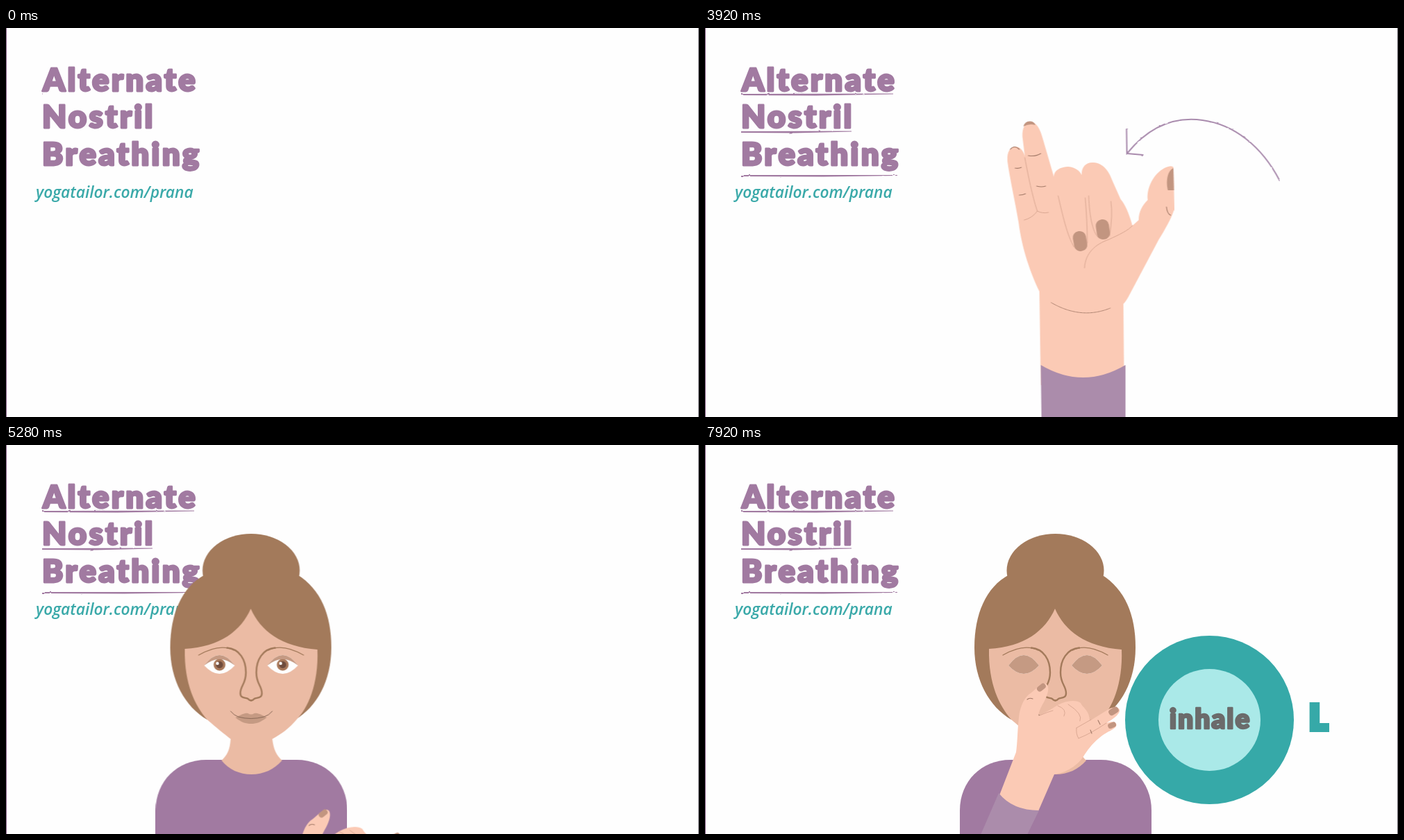
Write an HTML page that moves like this. It is 998x561 px and loops after 8000 ms.

```html
<!DOCTYPE html>
<html lang="en">
<head>
<meta charset="utf-8">
<title>Alternate Nostril Breathing</title>
<style>
html, body { margin: 0; width: 100%; height: 100%; overflow: hidden; background: #fefefe; }
svg { display: block; width: 100vw; height: 100vh; }
.anim { animation: 8s linear infinite; }

.chunky { font-family: Lato, "Open Sans", sans-serif; font-weight: 900; paint-order: stroke; stroke-linejoin: round; }
.title { font-size: 45.5px; letter-spacing: 3.2px; fill: #a17aa1; stroke: #a17aa1; stroke-width: 2.8px; }
.link { font: italic 600 22.8px "Open Sans", "Noto Sans", sans-serif; fill: #3aa9a9; }
.word { font-size: 39px; letter-spacing: 1.9px; fill: #6b6b6b; stroke: #6b6b6b; stroke-width: 2.4px; }
.side { font-size: 51px; fill: #36a9a8; stroke: #36a9a8; stroke-width: 6px; stroke-linejoin: miter; }

.line { fill: none; stroke-linecap: round; stroke-linejoin: round; }
.skin { fill: #fbcab5; }
.nail { fill: #c29580; }
.crease { stroke: #dba994; stroke-width: 1; }
.joint { stroke: #a37a68; stroke-width: 1.1; }
.sleeve { fill: #ab8cab; }
.brown { stroke: #a37a5b; }

/* Underlines */
#rule1 { animation-name: rule1; }
#rule2 { animation-name: rule2; }
#rule3 { animation-name: rule3; }
@keyframes rule1 { 0% { clip-path: inset(-3px 100% -3px 0); } 6%, 100% { clip-path: inset(-3px 0 -3px 0); } }
@keyframes rule2 { 0%, 5% { clip-path: inset(-3px 100% -3px 0); } 11%, 100% { clip-path: inset(-3px 0 -3px 0); } }
@keyframes rule3 { 0%, 10% { clip-path: inset(-3px 100% -3px 0); } 16%, 100% { clip-path: inset(-3px 0 -3px 0); } }

/* Large hand and its arrow */
#leave { animation-name: leave; }
@keyframes leave {
  0%, 48.5% { transform: none; animation-timing-function: cubic-bezier(.333, .26, .667, .593); }
  55%, 100% { transform: translateX(660px); }
}
#rise { animation-name: rise; }
@keyframes rise {
  0%, 18.5% { transform: translateY(567px); animation-timing-function: cubic-bezier(.3333, .6667, .6667, 1); }
  28.5%, 100% { transform: none; }
}
#wipe { animation-name: wipe; }
@keyframes wipe { 0%, 29.5% { width: 0; } 36.5%, 100% { width: 232px; } }

/* Woman */
#woman { animation-name: enter; }
@keyframes enter {
  0%, 60.86% { transform: translateX(-645px); animation-timing-function: cubic-bezier(.3333, .6667, .6667, 1); }
  70.86%, 100% { transform: none; }
}
#lift { animation-name: lift; }
@keyframes lift {
  0%, 63.5% { transform: translate(-35px, 230px); animation-timing-function: cubic-bezier(.3333, .6667, .6667, 1); }
  86.1%, 100% { transform: none; }
}
.lid { fill: #c59a83; animation-name: blink; }
@keyframes blink {
  0%, 73% { d: path("M437 318Q459 288 481 318Q459 300 437 318Z"); }
  79%, 100% { d: path("M437 318Q459 288 481 318Q459 342 437 318Z"); }
}

/* Breathing circle */
#breath { animation-name: show; }
@keyframes show { 0%, 81% { opacity: 0; } 85%, 100% { opacity: 1; } }
#lung { animation-name: inhale; }
@keyframes inhale { 0%, 83% { r: 52px; } 99%, 100% { r: 73.5px; } }
</style>
</head>
<body>
<svg viewBox="0 0 998 561" preserveAspectRatio="none">
  <defs>
    <filter id="rough" filterUnits="userSpaceOnUse" x="0" y="0" width="998" height="561">
      <feTurbulence type="fractalNoise" baseFrequency=".1" numOctaves="2" seed="4"/>
      <feDisplacementMap in="SourceGraphic" scale="2" xChannelSelector="R" yChannelSelector="G"/>
    </filter>
    <clipPath id="arrowClip"><rect id="wipe" class="anim" x="560" y="110" width="0" height="130"/></clipPath>
    <clipPath id="eyeClip"><path d="M437 318Q459 288 481 318Q459 342 437 318Z"/></clipPath>
    <g id="eye" clip-path="url(#eyeClip)">
      <rect x="436" y="300" width="46" height="32" fill="#fefefe"/>
      <circle cx="459" cy="317" r="8.500" fill="#a8785a"/>
      <circle cx="459" cy="317" r="5" fill="#6f4c3c"/>
      <circle cx="456" cy="315" r="2.200" fill="#fefefe"/>
    </g>
    <g id="brow" class="line brown">
      <path stroke-width="1.4" d="M429 303C448 292 466 289 480 296"/>
      <path stroke-width="2.4" d="M470 292.500C488 294 497 310 497 328C497 345 489 347 489 358C489 366 497 364 500 366Q502 368.500 504.500 368.500"/>
    </g>
  </defs>

  <g class="chunky title">
    <text x="53" y="90.500">Alternate</text>
    <text x="52" y="144">Nostril</text>
    <text x="52" y="197.500">Breathing</text>
  </g>
  <text class="link" x="43" y="245">yogatailor.com/prana</text>
  <g fill="#a17aa1" filter="url(#rough)">
    <path id="rule1" class="anim" d="M52 95L271 94.500V95.500L160 97.500L52 97Z"/>
    <path id="rule2" class="anim" d="M52 149L211 148.500V149.500L130 151.500L52 151Z"/>
    <path id="rule3" class="anim" d="M52 212L277 212V213L170 214.500L52 214Z"/>
  </g>

  <g id="leave" class="anim">
    <g id="rise" class="anim">
      <path class="skin" d="M440 380C428 355 415 320 410 280C405 250 397 215 394 192C393 178 398 172 405 171C412 171 417 177 419 185L416 160C414 145 420 135 427 135C436 136 441 145 445 160L461 215C460 205 472 200 482 200C492 201 498 206 501 212C500 200 508 193 518 194C532 195 540 206 545 220L557 247Q566 257 574 285L583 277C583 265 588 256 596 248C594 230 605 210 620 202C628 198 632 199 633 201L634 262C630 275 620 292 612 305L568 388Q564 395 561 398L562 515H442Z"/>
      <path class="sleeve" d="M442 486Q503 522 564 486V562H443Z"/>
      <g class="line crease">
        <path d="M419 187C425 220 432 250 437 264Q430 274 418 277M437 264Q444 268 453 266"/>
        <path d="M467 242C473 268 480 300 490 316M506 245Q509 280 509 310"/>
        <path d="M511 242C512 275 518 298 526 303M543 250Q546 270 541 300"/>
        <path d="M505 346C506 325 520 312 540 305C555 298 568 292 574 285"/>
      </g>
      <g class="line joint">
        <path d="M405 202Q410 203 414 201M411 241Q416 241 420 239M424 184Q434 186 442 181M436 228Q443 230 449 228"/>
        <path d="M623 258Q624 268 629 270M398 175Q404 168 411 175"/>
        <path stroke-dasharray="1.5 1" stroke-width=".9" d="M457 396Q500 421 542 404"/>
      </g>
      <g class="nail">
        <rect x="489" y="293" width="19" height="29" rx="9" transform="rotate(-10 498 307)"/>
        <rect x="522" y="276" width="19" height="29" rx="9" transform="rotate(-8 531 291)"/>
        <path d="M633 202C624 206 622 222 625 234H633.500Z"/>
        <path d="M417 142Q419 134 427 134.500Q433 135 434 140Q426 137 417 142Z"/>
      </g>
    </g>
    <g clip-path="url(#arrowClip)">
      <path class="line" filter="url(#rough)" stroke="#a98bad" stroke-width="2" d="M565.500 146L566 181L589 183M567 180C590 152 625 126 675 133C720 139 760 170 786 220"/>
    </g>
  </g>

  <g id="woman" class="anim">
    <g fill="#a37a5b">
      <ellipse cx="504.500" cy="181" rx="70" ry="53"/>
      <path d="M438 187C404 205 388 245 388 292C388 340 410 378 441 396H568C599 378 620 340 620 292C620 245 605 208 571 187Z"/>
    </g>
    <path fill="#a17aa1" d="M367 562V527C367 485 398 454 440 454H570C612 454 643 485 643 527V562Z"/>
    <path fill="#ebbba4" d="M504 236C490 268 460 291 409 294C408 345 424 376 441 396C455 408 466 417 475 424C474 440 470 447 462 455C472 468 488 475 505 475C522 475 538 468 549 455C541 447 537 440 535 424C548 417 560 408 570 396C586 380 602 345 600 295C548 291 518 268 504 236Z"/>
    <use href="#eye"/>
    <use href="#eye" x="91"/>
    <path class="lid anim" d="M437 318Q459 288 481 318Q459 300 437 318Z"/>
    <g transform="translate(91)"><path class="lid anim" d="M437 318Q459 288 481 318Q459 300 437 318Z"/></g>
    <use href="#brow"/>
    <use href="#brow" transform="translate(1009) scale(-1 1)"/>
    <path fill="#c59a83" d="M482 393C492 388 496 386 500 387Q504.500 390 509 387C513 386 518 388 527 393C518 400 512 402 504.500 402C497 402 490 400 482 393Z"/>
    <path class="line" stroke="#8b6a58" d="M475 384Q480 390 486 392Q504 397 523 392Q530 390 535 384"/>
  </g>

  <g id="lift" class="anim">
    <path class="skin" d="M424 505L448 443C450 430 450 410 452 393C453 381 458 367 466 360C475 354 481 346 488 344C495 343 496 352 492 362C488 373 481 380 480 391L482 390C495 383 502 379 508 375C520 368 535 367 541 372C544 379 554 383 554 398L583 380C592 376 598 379 597 384C595 390 588 395 578 401C590 397 594 401 592 406C588 411 580 413 572 419C560 428 553 437 547 446C540 458 525 472 503 475L480 528Q445 532 424 505Z"/>
    <path class="sleeve" d="M423 502Q443 527 481 527L464 562H397Z"/>
    <g class="line crease">
      <path d="M508 376Q522 381 517 391M523 374Q545 388 540 398M482 390Q493 385 501 383"/>
      <path d="M535 408L556 396M538 423Q556 416 578 401M535 408Q534 417 538 423"/>
    </g>
    <path class="line joint" d="M464 367Q467 364 472 366M566 397L569 403M555 411L557 416"/>
    <g class="nail">
      <rect x="581" y="379.500" width="15" height="9" rx="4" transform="rotate(-32 588 384)"/>
      <rect x="580" y="400.500" width="12" height="7.500" rx="3.500" transform="rotate(-24 586 404)"/>
      <rect x="477.500" y="346" width="14" height="8" rx="4" transform="rotate(-38 484 350)"/>
    </g>
  </g>

  <g id="breath" class="anim">
    <circle cx="726.500" cy="396.500" r="121.500" fill="#36a9a8"/>
    <circle id="lung" class="anim" cx="726.500" cy="396.500" r="52" fill="#aae9e8"/>
    <text class="chunky word" x="727.500" y="408.500" text-anchor="middle">inhale</text>
    <text class="chunky side" x="870" y="411">L</text>
  </g>

  <rect width="1" height="561" fill="#8a638a"/>
  <rect x="997" width="1" height="561" fill="#6c6870"/>
</svg>
</body>
</html>
```
